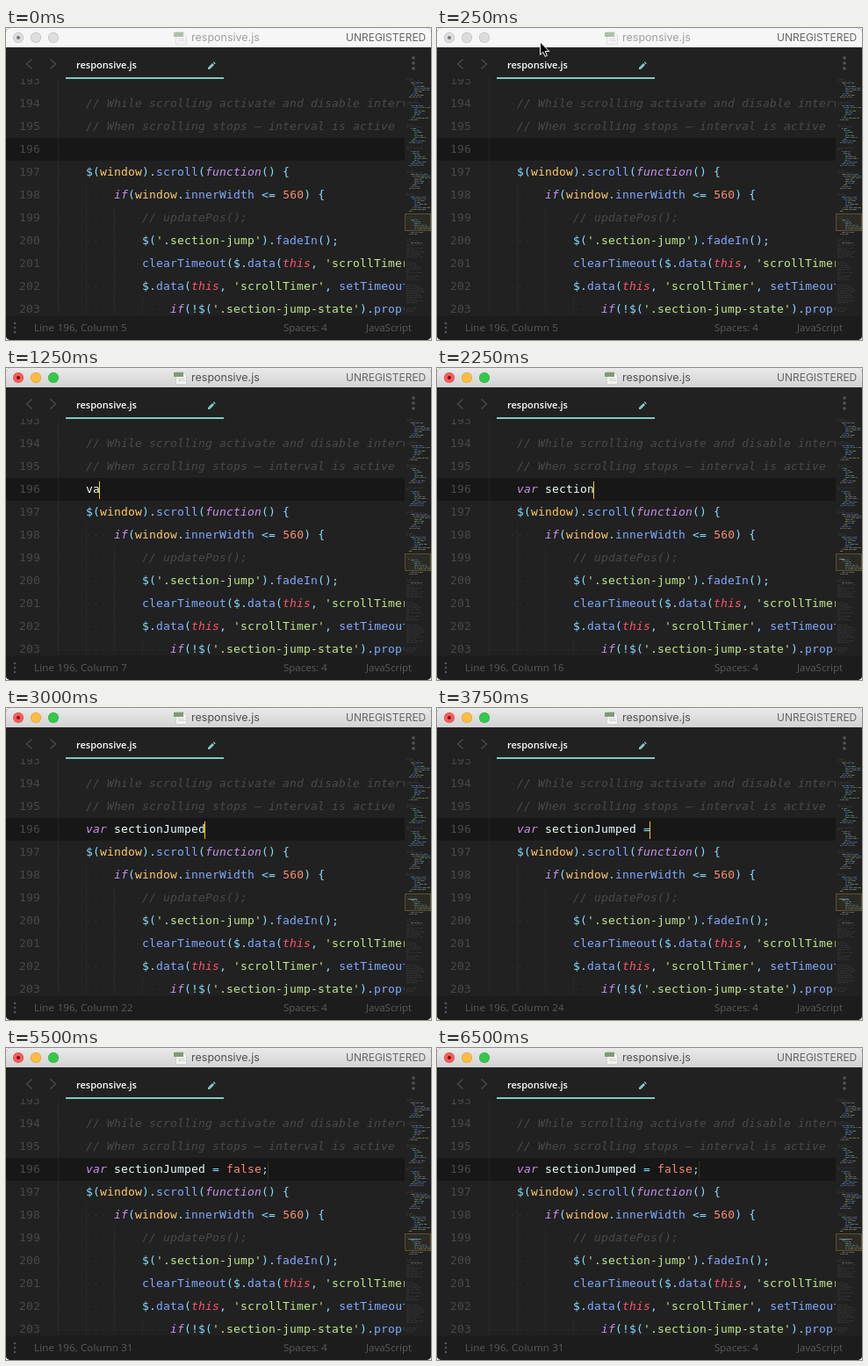
Animation, 484 px wide and 355 px high, one loop 6.75 s. Source, as an HTML page with a canvas:

```html
<!DOCTYPE html>
<html lang="en">
<head>
<meta charset="utf-8">
<title>Code editor</title>
<style>
  html, body { margin: 0; width: 100%; height: 100%; overflow: hidden; background: #fff; }
  #win { position: absolute; left: 0; top: 0; width: 484px; height: 355px; overflow: hidden;
    border-radius: 5px; background: #212121; }
  :where(#win *) { position: absolute; white-space: pre; }
  .line span, #typed span { position: static; }

  #bar { left: 0; top: 0; width: 484px; height: 22px; background: linear-gradient(#eaeaea, #d2d2d2); }
  #bar i { top: 5px; width: 12px; height: 12px; border-radius: 50%; box-shadow: inset 0 0 0 .5px #0003; }
  #bar i:first-child::after { content: ""; position: absolute; left: 4px; top: 4px;
    width: 4px; height: 4px; border-radius: 50%; background: #70100c; }
  #bar span { top: 0; line-height: 22px; font-family: Inter, sans-serif; color: #505050; }
  #bar .note { color: #666; }
  .idle #bar { background: #f6f6f6; }
  .idle #bar i { background: #ddd !important; }
  .idle #bar i:first-child::after { background: #777; }
  .idle #bar .name { color: #a0a0a0; }
  .idle #icon { opacity: .6; }

  .ui { top: 0; font: 11.5px/28px "Open Sans", sans-serif; color: #5b5b5b; }
  #tab { left: 80px; top: 28px; font: 600 11px/28px "Open Sans", sans-serif; color: #fff; }
  #line { left: 68px; top: 56px; width: 180px; height: 2px; background: #80cbc4; }

  #code { left: 0; top: 58px; width: 454px; height: 269px; overflow: hidden; }
  #row { left: 0; top: 67px; width: 454px; height: 26px; background: #171717; }
  .line, .num, #typed { font: 13px/26px "DejaVu Sans Mono", monospace; letter-spacing: .174px; color: #eff; }
  .num { left: 15px; color: #484848; }
  .dots { height: 1px; left: 62px; background: repeating-linear-gradient(90deg, #343434 0 1px, transparent 1px 8px); }
  .guide { width: 1px; background: repeating-linear-gradient(#303030 0 1px, transparent 1px 2px); }
  #typed { left: 91px; top: 67px; }
  #caret { top: 71px; width: 1px; height: 20px; background: #fc0; }

  .c { color: #4a4a4a; font-style: italic; }
  .p { color: #89ddff; }
  .f { color: #82aaff; }
  .y { color: #ffcb6b; }
  .k { color: #c792ea; font-style: italic; }
  .s { color: #c3e88d; }
  .n { color: #f78c6c; }
  .t { color: #ff5370; font-style: italic; }

  #map { left: 454px; top: 58px; }
  #mapLine { left: 458px; top: 217px; height: 1px; background: #6f7a7a; }
  #status { left: 0; top: 327px; width: 484px; height: 28px; background: #1c1c1c; }
  #pos { left: 32px; letter-spacing: .2px; }
  #art { left: 0; top: 0; }
</style>
</head>
<body>
<div id="win">
  <div id="bar">
    <i style="left:8px;background:#fc5b57"></i>
    <i style="left:28px;background:#fdbc40"></i>
    <i style="left:48px;background:#34c84a"></i>
    <span class="name" style="left:211px;font-size:12.5px">responsive.js</span>
    <span class="note" style="left:387px;font-size:12px">UNREGISTERED</span>
  </div>
  <span id="tab">responsive.js</span>
  <div id="line"></div>
  <div id="code">
    <div id="row"></div>
    <div id="typed"></div>
    <div id="caret"></div>
  </div>
  <canvas id="map" width="30" height="269"></canvas>
  <div id="mapLine"></div>
  <div id="status">
    <span class="ui" id="pos"></span>
    <span class="ui" style="left:316px">Spaces: 4</span>
    <span class="ui" style="left:410px">JavaScript</span>
  </div>
  <svg id="art" width="484" height="355" fill="none">
    <g id="icon">
      <path d="M193.500 4.500h8l4 4v10h-12z" fill="#f4f4f4" stroke="#cfcfcf"/>
      <path d="M191 5h11v5h-11z" fill="#7f9a78"/>
      <path d="M196 12.500h7M196 14.500h8" stroke="#c9cfc5"/>
    </g>
    <path d="M29.500 35.500l-6 5.500 6 5.500M50.500 35.500l6 5.500-6 5.500" stroke="#484848" stroke-width="1.500"/>
    <path d="M230 47v-2l5-5 2 2-5 5zM235.700 39.300l1-1 2 2-1 1z" fill="#80cbc4"/>
    <g fill="#555">
      <circle cx="464" cy="34" r="1.800"/><circle cx="464" cy="40" r="1.800"/><circle cx="464" cy="46" r="1.800"/>
      <circle cx="10" cy="336" r="1.300"/><circle cx="10" cy="341" r="1.300"/><circle cx="10" cy="346" r="1.300"/>
    </g>
    <path id="mouse" d="M117.500 16v14.500l3.300-3.100 2.300 5 2.300-1-2.200-4.900h4.600z" fill="#000" stroke="#fff"/>
  </svg>
</div>
<script>
const LOOP = 6750;
const $ = id => document.getElementById(id);
const code = $('code');

// Markup: {class|text} colours a piece of code.
const paint = s => s.replace(/</g, '&lt;').replace(/\{(\w)\|([^}]*)\}/g, '<span class="$1">$2</span>');

function add(cls, css, html = '') {
  const el = document.createElement('div');
  el.className = cls;
  el.style.cssText = css;
  el.innerHTML = html;
  code.insertBefore(el, $('typed'));
}

// Rows from line 193 on: indent in levels, then the code.
const rows = [
  [0, ''],
  [1, '{c|// While scrolling activate and disable interval}'],
  [1, '{c|// When scrolling stops – interval is active}'],
  [0, ''],
  [1, '{p|$(}{y|window}{p|).}{f|scroll}{p|(}{k|function}{p|() &#123;}'],
  [2, '{k|if}{p|(}{y|window}{p|.}{f|innerWidth} {p|<=} {n|560}{p|) &#123;}'],
  [3, '{c|// updatePos();}'],
  [3, "{p|$(}{s|'.section-jump'}{p|).}{f|fadeIn}{p|();}"],
  [3, "{f|clearTimeout}{p|($.}{f|data}{p|(}{t|this}{p|,} {s|'scrollTimer'}{p|));}"],
  [3, "{p|$.}{f|data}{p|(}{t|this}{p|,} {s|'scrollTimer'}{p|,} {f|setTimeout}{p|(}"],
  [4, "{k|if}{p|(!$(}{s|'.section-jump-state'}{p|).}{f|prop}{p|(}"]
];
add('guide', 'left:59px;top:0;height:269px');
rows.forEach(([depth, text], i) => {
  const top = i * 26 - 11;
  add('num', `top:${top}px`, 193 + i);
  if (!depth) return;
  add('dots', `top:${top + 13}px;width:${depth * 32 - 2}px`);
  for (let d = 1; d < depth; d++) add('guide', `left:${59 + d * 32}px;top:${top}px;height:26px`);
  add('line', `left:${59 + depth * 32}px;top:${top}px`, paint(text));
});

function drawMap() {
  const g = $('map').getContext('2d');
  const inks = ['#4a5c83', '#4f737c', '#65754f', '#455a83', '#6a6350'];
  let seed = 17;
  const rnd = () => (seed = seed * 16807 % 2147483647) / 2147483647;
  g.fillStyle = '#2b2a24';
  g.fillRect(0, 153, 30, 20);
  for (let y = 0; y < 266; y += 2) {
    const tail = y > 186;
    const step = y % 26;
    const note = tail || step < 4;
    if (step > 21) continue;
    // Each block is indented towards its middle.
    let x = note ? 2 : 3 + Math.round(Math.sin(step / 22 * Math.PI) * 4) * 2;
    const end = Math.min(29, x + 3 + rnd() * (tail ? 18 : 15));
    while (x < end) {
      const w = 1 + rnd() * 4;
      g.fillStyle = note ? '#333' : inks[Math.floor(rnd() * inks.length)];
      g.fillRect(x, y, Math.min(w, 29 - x), 1);
      x += w + 1;
    }
  }
  g.strokeStyle = '#5c522e';
  g.strokeRect(.5, 153.5, 29, 19);
}
drawMap();

// Start time and number of typed characters.
const typing = [[0, 0], [1250, 2], [1750, 3], [2250, 11], [3000, 17], [3750, 19], [4000, 25], [4500, 26]];

function typed(n) {
  if (n < 3) return 'va'.slice(0, n);
  const name = 'sectionJumped'.slice(0, Math.max(0, n - 4));
  let out = '{k|var} ' + name;
  if (n > 18) out += ' {p|=}';
  if (n > 20) out += ' {n|' + 'false'.slice(0, n - 20) + '}';
  if (n > 25) out += '{p|;}';
  return paint(out);
}

function caretAlpha(t, since) {
  if (t < 500) return 0;
  if (t >= 5000) return Math.floor(t / 250) % 2 ? 1 : .15;
  return t - Math.max(since, 500) < 500 ? 1 : 0;
}

let shown = -1;
function frame(now) {
  const t = now % LOOP;
  const [since, n] = typing.filter(s => s[0] <= t).pop();
  if (n !== shown) {
    shown = n;
    $('typed').innerHTML = typed(n);
    $('pos').textContent = 'Line 196, Column ' + (5 + n);
    $('caret').style.left = 90 + n * 8 + 'px';
    $('mapLine').style.width = n * .57 + 'px';
  }
  $('caret').style.opacity = caretAlpha(t, since);
  $('win').className = t < 500 ? 'idle' : '';
  $('mouse').style.visibility = t >= 250 && t < 750 ? 'visible' : 'hidden';
  requestAnimationFrame(frame);
}
frame(performance.now());
</script>
</body>
</html>
```
